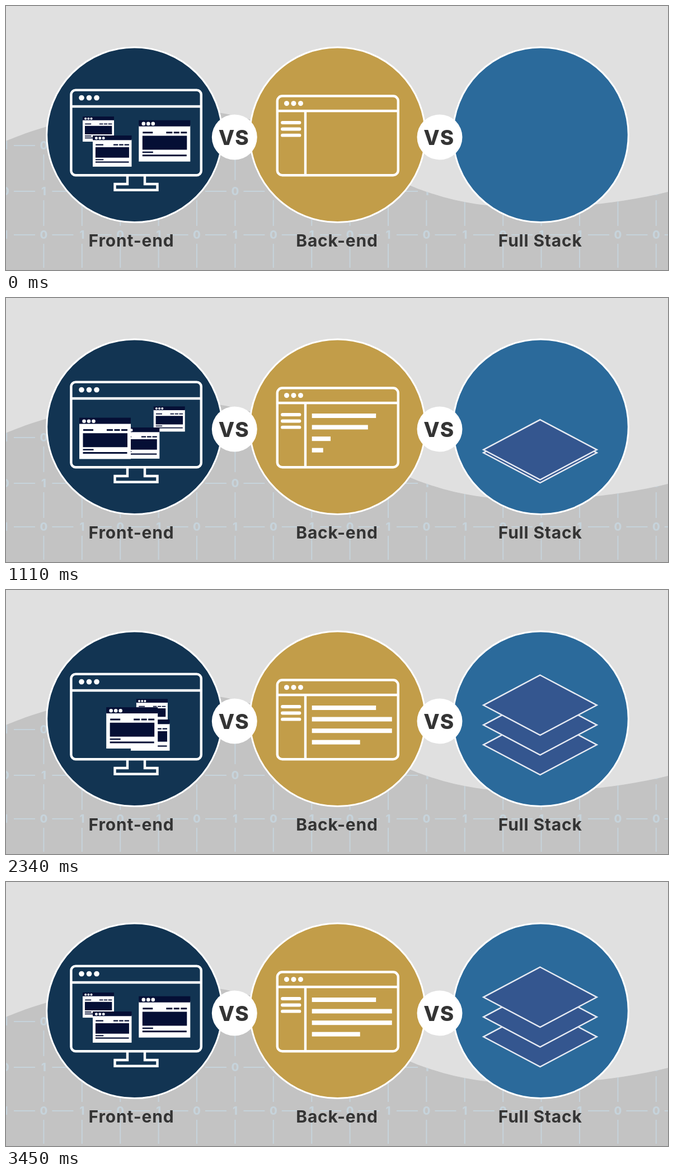
Animation, 1183 px wide and 473 px high, one loop 3480 ms. Source, as an HTML page:

```html
<!DOCTYPE html>
<html lang="en">
<head>
<meta charset="utf-8">
<title>Front-end vs Back-end vs Full Stack</title>
<style>
  html, body { margin: 0; width: 100%; height: 100%; overflow: hidden; background: #e0e0e0; }
  svg { display: block; width: 100%; height: 100%; }
  text { font-family: Inter, "Open Sans", sans-serif; font-weight: 700; text-anchor: middle; fill: #343434; }
  .label { font-size: 30px; letter-spacing: .8px; }
  .versus { font-size: 37px; font-weight: 800; letter-spacing: 1px; }
  .digit { font-size: 20px; font-weight: 800; fill: #c6d3db; }
  .grid { stroke: #c6d3db; stroke-width: 2; }
  .line { fill: none; stroke: #fff; stroke-width: 4.4; }
  .white { fill: #fff; }
  .navy { fill: #050f35; }
  .ring { stroke: #fff; stroke-width: 3; }
  .sheet { fill: #34568f; stroke: #e4e9f2; stroke-width: 2.5; }
</style>
</head>
<body>
<svg viewBox="0 0 1183 473" preserveAspectRatio="none">
  <defs>
    <path id="wave" d="M0 242C60 216 180 181 300 184S480 217 560 251C620 277 680 304 735 327C800 351 850 360 930 361C1020 362 1110 351 1183 333V473H0Z"/>
    <clipPath id="hill"><use href="#wave"/></clipPath>
    <clipPath id="disc"><circle cx="955.5" cy="230.8" r="155.3"/></clipPath>
    <g id="window">
      <rect class="white" y="9" width="92" height="65"/>
      <rect class="navy" width="92" height="11"/>
      <g class="white">
        <circle cx="8.5" cy="6.2" r="3.3"/><circle cx="17" cy="6.2" r="3.3"/><circle cx="25.5" cy="6.2" r="3.3"/>
      </g>
      <path class="navy" d="M7 20.5h18v3H7zM49 20.5h11v3H49zM62.5 20.5h10v3h-10zM75 20.5h11v3H75zM6.5 27.7H86v25H6.5zM6.5 56h19v2.5h-19zM6.500 61.500h79v3h-79z"/>
    </g>
  </defs>

  <rect width="1183" height="473" fill="#e0e0e0"/>
  <use href="#wave" fill="#c3c3c3"/>
  <g id="grid" clip-path="url(#hill)"></g>

  <circle class="ring" cx="229.5" cy="230.8" r="156.8" fill="#123452"/>
  <circle class="ring" cx="592.5" cy="230.8" r="156.8" fill="#c29d49"/>
  <circle class="ring" cx="955.5" cy="230.8" r="156.8" fill="#2b6a9b"/>
  <g id="sheets" clip-path="url(#disc)"></g>

  <g class="line">
    <rect x="116.4" y="150.6" width="232.4" height="152.6" rx="8"/>
    <path d="M117 180H348M217 304V319H194.500V329.800H270.500V319H248V304"/>
  </g>
  <g class="white">
    <circle cx="135" cy="164.500" r="4.800"/><circle cx="148.500" cy="164.500" r="4.800"/><circle cx="162" cy="164.500" r="4.800"/>
  </g>
  <g id="windows"></g>

  <g class="line">
    <rect x="484.800" y="161.300" width="216" height="141.900" rx="9"/>
    <path d="M485 188H701M535 188V303"/>
    <path d="M494 209H524.500M494 220.500H524.500M494 231.700H524.500" style="stroke-width:5.8;stroke-linecap:round"/>
  </g>
  <g class="white">
    <circle cx="501.500" cy="174.500" r="4.500"/><circle cx="514" cy="174.500" r="4.500"/><circle cx="526.500" cy="174.500" r="4.500"/>
  </g>
  <g id="bars" class="white"></g>

  <circle class="white" cx="408.300" cy="235" r="40.500"/>
  <circle class="white" cx="775" cy="235" r="40.500"/>
  <text class="versus" x="407.300" y="249">VS</text>
  <text class="versus" x="773.800" y="249">VS</text>
  <text class="label" x="224" y="431">Front-end</text>
  <text class="label" x="591.500" y="431">Back-end</text>
  <text class="label" x="954.700" y="431">Full Stack</text>
</svg>
<script>
const LOOP = 3480, STEP = 30;
const byId = id => document.getElementById(id);

function add(parent, tag, attrs, text) {
  const el = document.createElementNS("http://www.w3.org/2000/svg", tag);
  for (const key in attrs) el.setAttribute(key, attrs[key]);
  if (text) el.textContent = text;
  return parent.appendChild(el);
}

const progress = (t, [start, end]) => Math.min(1, Math.max(0, (t - start) / (end - start)));
const mix = (a, b, k) => a + (b - a) * k;

// Binary digits joined by thin lines.
const gap = 68.4;
const rows = [
  { y: 250, digits: "101010100101010101" },
  { y: 332, digits: "010101010101010110" },
  { y: 410, digits: "101010101010101100" }
];
for (const { y, digits } of rows) {
  [...digits].forEach((digit, i) => {
    const x = i * gap - 1;
    add(byId("grid"), "text", { class: "digit", x, y: y + 7 }, digit);
    add(byId("grid"), "path", { class: "grid", d: `M${x + 15} ${y}h38M${x} ${y + 16}v${y > 400 ? 43 : 46}` });
  });
}

// Each window glides out and back; go and back are time spans in ms.
const windows = [
  { from: [137, 198], to: [274, 194], scale: 0.609, go: [0, 1200], back: [1928, 3301] },
  { from: [155, 232], to: [238, 232], scale: 0.755, go: [322, 1634], back: [2098, 3440] },
  { from: [237.3, 204.7], to: [131, 214.5], scale: 1, go: [0, 900], back: [1796, 2996] }
];
for (const w of windows) w.el = add(byId("windows"), "use", { href: "#window" });

const bars = [
  { y: 207, width: 114.5, span: [0, 900] },
  { y: 227.5, width: 143, span: [480, 1380] },
  { y: 248.2, width: 143, span: [900, 1800] },
  { y: 268.7, width: 86, span: [900, 1800] }
];
for (const b of bars) b.el = add(byId("bars"), "rect", { x: 546.7, y: b.y, height: 8, width: 0 });

// Sheets rise one after another from below the disc.
const sheets = [277.3, 241.8, 206.3].map((y, i) => ({
  y,
  span: [i * 600, i * 600 + 600],
  el: add(byId("sheets"), "path", { class: "sheet", d: "M0-53.8L101.3 0L0 53.8L-101.3 0Z" })
}));

function draw(t) {
  for (const w of windows) {
    const k = progress(t, w.go) - progress(t, w.back);
    const x = mix(w.from[0], w.to[0], k), y = mix(w.from[1], w.to[1], k);
    w.el.setAttribute("transform", `translate(${x} ${y}) scale(${w.scale})`);
  }
  for (const b of bars) b.el.setAttribute("width", b.width * progress(t, b.span));
  for (const s of sheets) {
    s.el.setAttribute("transform", `translate(954.5 ${mix(442, s.y, progress(t, s.span))})`);
  }
}

const begin = performance.now();
function tick() {
  const t = (performance.now() - begin) % LOOP;
  draw(Math.floor(t / STEP) * STEP);
  requestAnimationFrame(tick);
}
tick();
</script>
</body>
</html>
```
